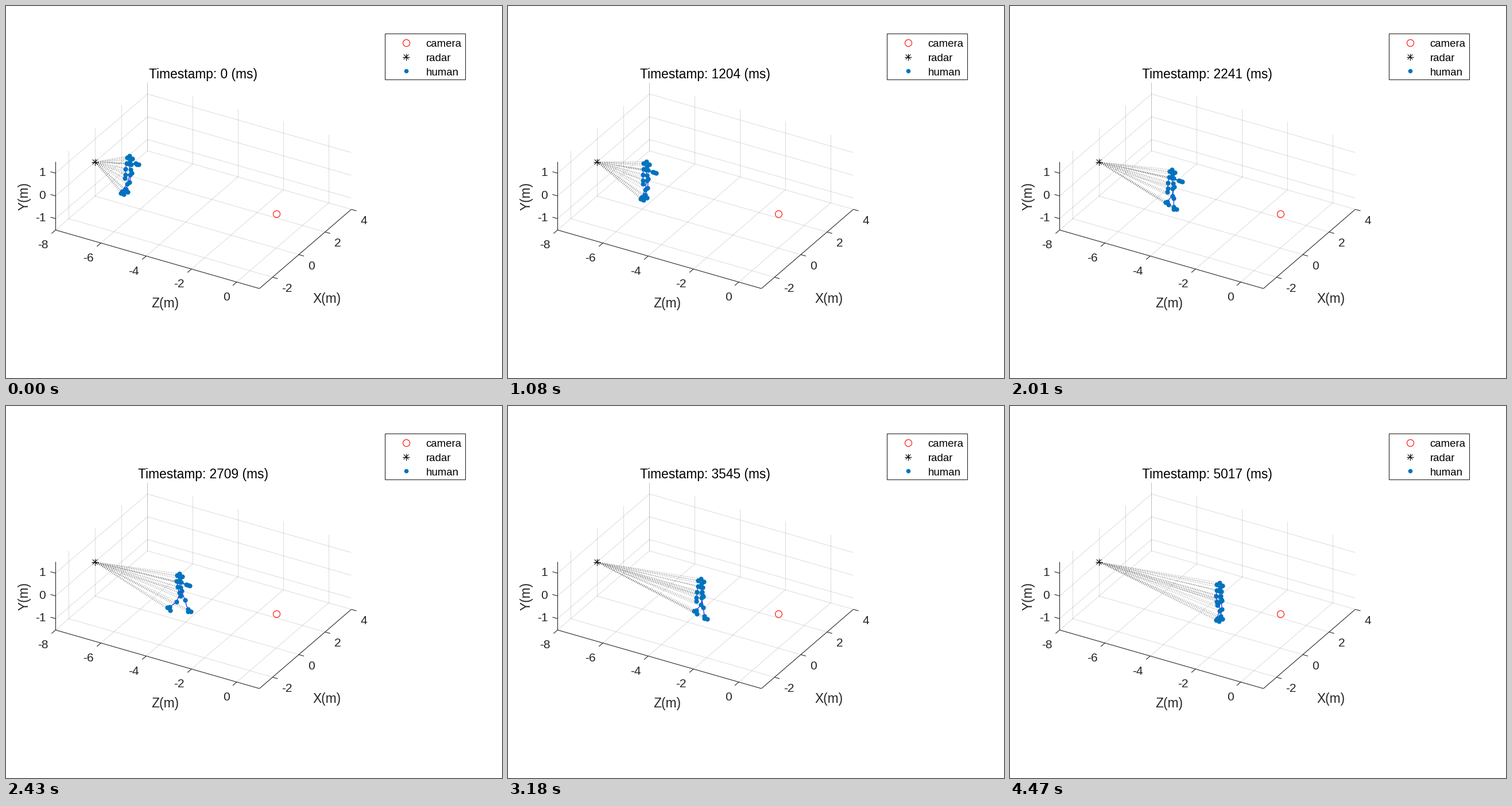
These frames come from a looping animation (864x648 px, 4500 ms). A matplotlib script:

```python
import math

import matplotlib.pyplot as plt
import numpy as np
from matplotlib.animation import FuncAnimation
from matplotlib.collections import LineCollection
from matplotlib.patches import Rectangle

W, H, DPI = 864, 648, 100
FRAMES, STEP = 150, 30
PX = 72 / DPI  # points per pixel
INK = "#262626"
BLUE = "#0072BD"

plt.rcParams["font.family"] = "Liberation Sans"
plt.rcParams["axes.unicode_minus"] = False

fig = plt.figure(figsize=(W / DPI, H / DPI), dpi=DPI, facecolor="white")
ax = fig.add_axes([0, 0, 1, 1])
ax.set_xlim(0, W)
ax.set_ylim(H, 0)
ax.axis("off")


def project(x, y, z):
    """World metres to stage pixels."""
    return (86.4 + 39.45 * (z + 8) + 22.86 * (x + 3),
            390.2 + 11.33 * (z + 8) - 19.7 * (x + 3) - 39.6 * (y + 1.5))


def label(x, y, s, size, color=INK, **kw):
    return ax.text(x, y, s, fontsize=size * PX, color=color, va="baseline", **kw)


def segments(segs, color, width=1.0, **kw):
    lines = LineCollection(segs, colors=color, linewidths=width * PX, **kw)
    ax.add_collection(lines)
    return lines


def star(x, y, r=6):
    arms = []
    for k in range(4):
        dx, dy = r * math.cos(k * math.pi / 4), r * math.sin(k * math.pi / 4)
        arms.append([(x - dx, y - dy), (x + dx, y + dy)])
    segments(arms, "black", 1.1, zorder=6)


def ring(x, y):
    ax.plot(x, y, "o", ms=12 * PX, mfc="none", mec="red", mew=1.1 * PX, zorder=6)


# ---- axes box ----
X0, X1, Y0, Y1, Z0, Z1 = -3, 4, -1.5, 1.5, -8, 1
X_TICKS, Y_TICKS, Z_TICKS = range(-2, 5, 2), range(-1, 2), range(-8, 1, 2)

grid = []
for x in X_TICKS:
    grid.append([project(x, Y0, Z0), project(x, Y0, Z1)])
    grid.append([project(x, Y0, Z0), project(x, Y1, Z0)])
for z in Z_TICKS:
    grid.append([project(X0, Y0, z), project(X1, Y0, z)])
    grid.append([project(X1, Y0, z), project(X1, Y1, z)])
for y in Y_TICKS:
    grid.append([project(X0, y, Z0), project(X1, y, Z0)])
    grid.append([project(X1, y, Z0), project(X1, y, Z1)])
segments(grid, (0.15, 0.15, 0.15, 0.16), zorder=1)

left, front = project(X0, Y0, Z0), project(X0, Y0, Z1)
edges = [[left, front], [front, project(X1, Y0, Z1)], [left, project(X0, Y1, Z0)]]


def tick(point, dx, dy):
    edges.append([point, (point[0] + dx, point[1] + dy)])
    return point


for z in Z_TICKS:
    px, py = tick(project(X0, Y0, z), -7, 6)
    label(px - 12.5, py + 32, str(z), 21, ha="right")
for x in X_TICKS:
    px, py = tick(project(x, Y0, Z1), 9, 2.5)
    label(px + 16, py + 25.8, str(x), 21, ha="left")
for y in Y_TICKS:
    px, py = tick(project(X0, y, Z0), -9, -2.5)
    label(69.3, py + 5, str(y), 21, ha="right")
segments(edges, INK, 1.1, zorder=2)

label(277, 525, "Z(m)", 22.8, ha="center")
label(559, 516.5, "X(m)", 22.8, ha="center")
label(39, 331, "Y(m)", 22.8, ha="center", rotation=90, rotation_mode="anchor")
title = label(343.8, 126, "", 22.8, "black", ha="center")

# ---- legend ----
ax.add_patch(Rectangle((660, 48), 140, 79.5, fc="white", ec=INK, lw=1.1 * PX))
for row, name in enumerate(("camera", "radar", "human")):
    label(731.5, 71 + 24.8 * row, name, 18.7, "black", ha="left")
ring(697, 64)
star(697, 88.7)
ax.plot(697, 113.3, "o", ms=7.6 * PX, color=BLUE, mew=0)

RADAR = project(0, 0, -8)
star(*RADAR)
ring(*project(0, 0, 0))

# ---- walking figure ----
BONES = [("nose", "neck"), ("neck", "shoulder_l"), ("neck", "shoulder_r"),
         ("neck", "spine"), ("spine", "hip_l"), ("spine", "hip_r")]
for s in "lr":
    BONES += [(a + s, b + s) for a, b in (
        ("shoulder_", "elbow_"), ("elbow_", "wrist_"), ("wrist_", "hand_"),
        ("hip_", "knee_"), ("knee_", "ankle_"),
        ("ankle_", "heel_"), ("ankle_", "toe_"))]

# Offsets from the crown of the head, in pixels.
TORSO = {"crown": (0, 0), "ear_l": (-4.5, 3), "ear_r": (5, 5), "nose": (1, 8),
         "shoulder_l": (-5, 13), "neck": (-1, 13.5), "shoulder_r": (3, 15),
         "spine": (1.5, 23.5), "hip_l": (1, 33), "hip_r": (3.5, 30)}
STRIDE = np.array([12.5, 4])


def mix(a, b, t):
    return np.array(a) * (1 - t) + np.array(b) * t


def ease(t):
    t = min(max(t, 0), 1)
    return t * t * (3 - 2 * t)


def bezier(a, b, c, d, t):
    u = 1 - t
    return a * u**3 + 3 * b * u * u * t + 3 * c * u * t * t + d * t**3


def gait(n):
    """Stride cycles walked: a slow start, then a steady pace."""
    return np.interp(n, [0, 36, 53, 81, 123, 149], [-1.75, -1.25, -0.75, 0, 1, 1.75])


def pose(n):
    t = n / (FRAMES - 1)
    cycle = 2 * math.pi * gait(n)
    swing = math.cos(cycle)  # +1 when the right foot leads
    lean = -9 * (1 - t) ** 3
    head = np.array([bezier(215, 223.7, 364.5, 364.5, t),
                     bezier(262.2, 271, 308, 309.2, t) + 1.2 * math.cos(2 * cycle)])
    j = {name: np.array(p) for name, p in TORSO.items()}

    hand = -3.5 + 5.5 * swing + lean / 2
    elbow = -4 + hand / 3
    j["elbow_l"] = (elbow, 23)
    j["wrist_l"] = ((elbow + hand) / 2, 32.5)
    j["hand_l"] = (hand, 39)

    lowered = ease((n - 81) / 25)
    raised = mix((13, 14.5), (14.5, 20), ease(n / 50))
    wrist = mix(raised, (3.5, 29), lowered)
    j["wrist_r"] = wrist
    j["elbow_r"] = wrist + mix((-2.5, -1.5), (-1, -6), lowered)
    j["hand_r"] = wrist + mix((3, 0.7), (1, 2), lowered)

    for s, base, ahead in (("r", (2.5, 58), swing), ("l", (-4, 62), -swing)):
        ankle = base + ahead * STRIDE + (lean, 0)
        f = (1 + ahead) / 2
        j["ankle_" + s] = ankle
        j["heel_" + s] = ankle + mix((-4, 1), (0, 4), f)
        j["toe_" + s] = ankle + mix((1, 6), (5.5, 4), f)
        j["knee_" + s] = (j["hip_" + s] + ankle) / 2 + mix((3, 3), (0.5, 0), f)
    return {name: head + p for name, p in j.items()}


rays = segments([], "#606060", 0.9, linestyles=[(0, (1, 2.4))], zorder=3)
bones = segments([], "blue", 1.1, zorder=4)
joints, = ax.plot([], [], "o", ms=8.2 * PX, color=BLUE, mew=0, zorder=5)


def draw(n):
    j = pose(n)
    points = np.array(list(j.values()))
    rays.set_segments([[RADAR, p] for p in points])
    bones.set_segments([[j[a], j[b]] for a, b in BONES])
    joints.set_data(points[:, 0], points[:, 1])
    sample = n * FRAMES // (FRAMES - 1)  # one more clock sample than frames
    title.set_text(f"Timestamp: {int(0.4 + 33.4445 * sample)} (ms)")
    return rays, bones, joints, title


anim = FuncAnimation(fig, draw, frames=FRAMES, interval=STEP, repeat=True,
                     repeat_delay=0, init_func=lambda: draw(0))
plt.show()
```
